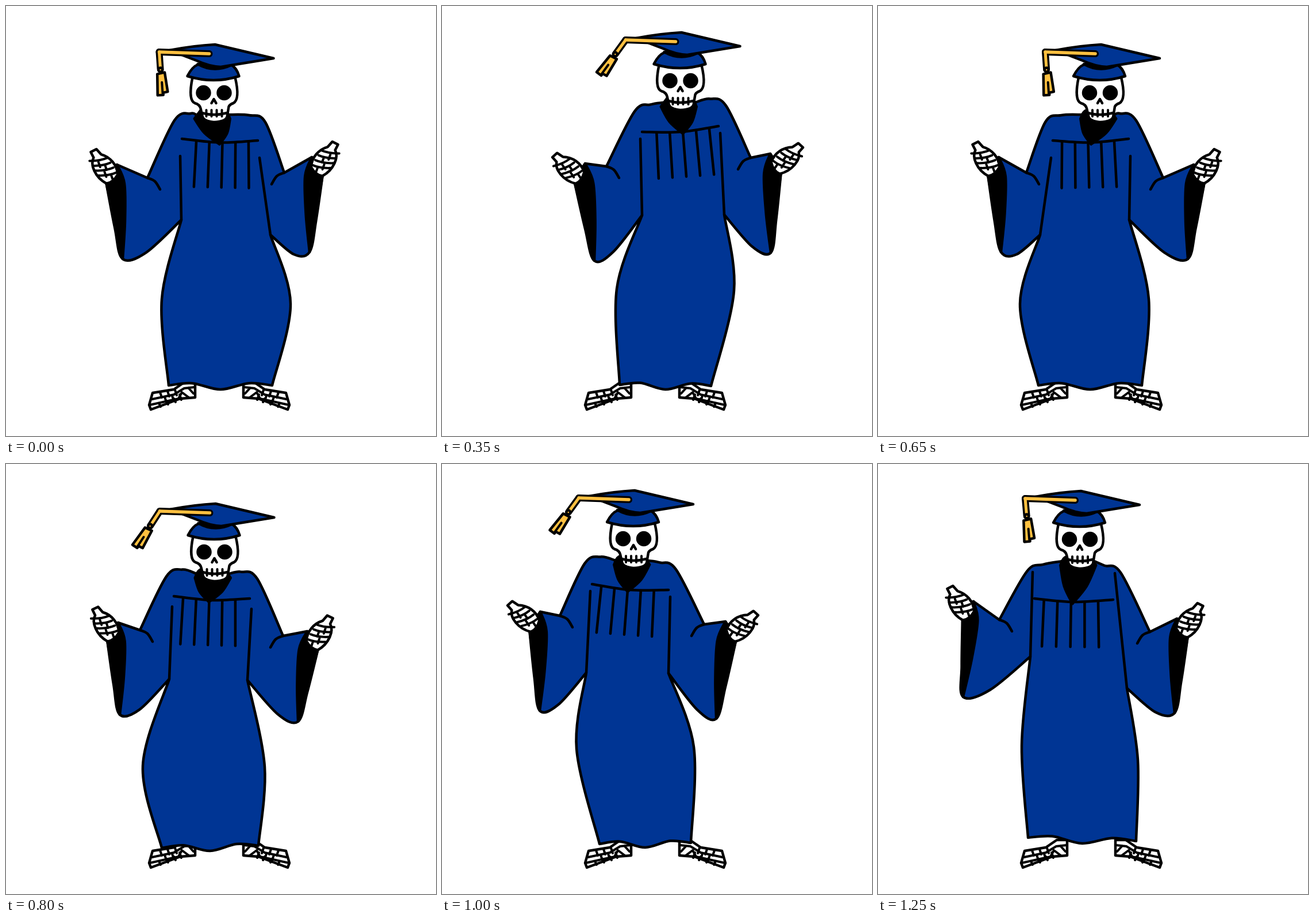
Animation, 748 px wide and 748 px high, one loop 1300 ms. Source, as an HTML page with a canvas:

```html
<!DOCTYPE html>
<html lang="en">
<head>
<meta charset="utf-8">
<title>Dancing graduate</title>
<style>
  html, body { margin: 0; width: 100%; height: 100%; overflow: hidden; background: #fff; }
  canvas { display: block; }
</style>
</head>
<body>
<canvas id="stage" width="748" height="748"></canvas>
<script>
const ctx = document.getElementById('stage').getContext('2d');
const BLUE = '#003594', GOLD = '#ffc040', INK = '#000', WHITE = '#fff';
const STEP = 50, HALF = 650, AXIS = 742;

// Joints of half a dance cycle; the other half is its mirror image.
// Each side: elbow, wrist, cuff, armpit, hip, hem, yoke end.
// drop: start of the torso line below the yoke; hand, swing: angles in degrees.
const POSES = [
  { at: 0, head: [358.75, 151], drop: 30, hand: 32, swing: -4,
    left: [246, 299, 184, 303, 203, 440, 305, 372, 271, 510, 283, 660, 306, 231],
    right: [484, 290, 541, 290, 528, 428, 460, 398, 495, 518, 463, 660, 438, 234] },
  { at: 150, head: [382.25, 153], drop: 18, hand: 31, swing: 33,
    left: [260, 299, 209, 318, 234, 448, 322, 376, 292, 527, 303, 664, 318, 234],
    right: [509, 289, 556, 303, 544, 436, 458, 374, 504, 525, 471, 668, 450, 230] },
  { at: 350, head: [411.75, 130], drop: 12, hand: 47, swing: 36,
    left: [286, 279, 240, 301, 265, 443, 348, 364, 304, 492, 309, 659, 348, 219],
    right: [537, 264, 580, 284, 572, 429, 491, 363, 508, 495, 468, 661, 481, 209] },
  { at: 550, head: [425.25, 116], drop: 4, hand: 50, swing: -4,
    left: [298, 259, 248, 288, 257, 403, 337, 357, 303, 530, 291, 656, 368, 207],
    right: [553, 244, 604, 263, 617, 380, 496, 314, 497, 408, 479, 661, 500, 213] },
  { at: 600, head: [393.75, 131], drop: -46, hand: 32, swing: -5,
    left: [269, 292, 213, 296, 226, 433, 309, 390, 290, 515, 293, 656, 333, 236],
    right: [531, 271, 585, 266, 594, 405, 477, 335, 492, 490, 481, 650, 470, 234] }
];

const mod = (n, m) => (n % m + m) % m;
const mix = (a, b, u) => [a[0] + (b[0] - a[0]) * u, a[1] + (b[1] - a[1]) * u];
const mirror = list => list.map((v, i) => i % 2 ? v : AXIS - v);
const vector = p => [...p.left, ...p.right, ...p.head, p.drop, p.hand, p.swing];
const flipped = p => ({ ...p, left: mirror(p.right), right: mirror(p.left), head: mirror(p.head) });
const KEYS = [...POSES.map(vector), ...POSES.map(p => vector(flipped(p)))];

const keyTime = n => POSES[mod(n, POSES.length)].at + HALF * Math.floor(n / POSES.length);

// Hermite spline through the poses; even entries (x, angle) never overshoot.
function poseAt(t) {
  let i = 0;
  while (keyTime(i + 1) <= t) i++;
  const span = n => keyTime(n + 1) - keyTime(n);
  const h = span(i), u = (t - keyTime(i)) / h, w = 1 - u;
  return KEYS[0].map((_, j) => {
    const value = n => KEYS[mod(n, KEYS.length)][j];
    const rate = n => (value(n + 1) - value(n)) / span(n);
    const slope = n => {
      const a = rate(n - 1), b = rate(n);
      if (j % 2 === 0 && a * b <= 0) return 0;
      return (a * span(n) + b * span(n - 1)) / (span(n) + span(n - 1));
    };
    return w * w * (1 + 2 * u) * value(i) + u * u * (3 - 2 * u) * value(i + 1)
      + h * u * w * (w * slope(i) - u * slope(i + 1));
  });
}

// Smooth path through points; a doubled point makes a corner.
function curve(pts, closed) {
  const path = new Path2D();
  path.moveTo(...pts[0]);
  for (let i = 0; i < pts.length - 1; i++) {
    const b = pts[i], c = pts[i + 1], a = pts[i - 1] || b, d = pts[i + 2] || c;
    if (b === c) continue;
    path.bezierCurveTo(
      b[0] + (c[0] - a[0]) / 6, b[1] + (c[1] - a[1]) / 6,
      c[0] - (d[0] - b[0]) / 6, c[1] - (d[1] - b[1]) / 6, ...c);
  }
  if (closed) path.closePath();
  return path;
}

function paint(shape, fill, width = 4.5, color = INK) {
  const path = typeof shape === 'string' ? new Path2D(shape) : shape;
  if (fill) {
    ctx.fillStyle = fill;
    ctx.fill(path);
  }
  ctx.lineWidth = width;
  ctx.strokeStyle = color;
  ctx.stroke(path);
}

function dot(x, y, r, fill, width) {
  const path = new Path2D();
  path.arc(x, y, r, 0, 7);
  paint(path, fill, width);
}

function placed([x, y], degrees, flip, draw) {
  ctx.save();
  ctx.translate(x, y);
  ctx.rotate(degrees * Math.PI / 180);
  ctx.scale(flip, 1);
  draw();
  ctx.restore();
}

function foot() {
  paint('M329 654V681L303 683L252 702L249 694L255 673L292 667L311 654Z', WHITE, 4.5);
  paint('M254 684L292 676L310 665L328 663M250 694L300 683L306 672L318 681M317 664L326 674', null, 4);
  for (let i = 0; i < 3; i++) {
    const x = 268 + 13 * i, y = 672 - 2 * i;
    paint(`M${x} ${y}l3 9M${x + 8} ${y + 8}l3 9M${x - 2} ${y + 19 - 2 * i}l3 6`, null, 4);
  }
}

function hand() {
  paint('M-14 -3C-22 -18 -19 -36 -8 -48L-6 -60L5 -61L6 -50C18 -43 22 -20 11 0Q0 5 -14 -3Z', WHITE);
  for (let i = 0; i < 4; i++) {
    const y = -42 + 10 * i, x = i % 2 ? -4 : 3;
    paint(`M-14 ${y + 5}Q0 ${y + 3} 15 ${y - 7}M${x} ${y + 3}l2 9`, null, 4);
  }
}

function tassel() {
  paint('M0 0V30', null, 12);
  paint('M0 0V30', null, 5, GOLD);
  paint('M-6 38L7 36L10 70L2 71V75L-8 75Z', GOLD);
  paint('M1 53V72', null, 4);
  dot(0, 31, 3.5, GOLD, 4.5);
}

function head(swing) {
  paint('M-37 -27C-41 -8 -43 14 -33 18Q-25 20 -23 27L-20 40Q-19 49 0 51Q20 50 23 42L26 24' +
    'Q28 20 34 18C43 13 42 -6 37 -27Z', WHITE);
  dot(-18, 0, 11, INK);
  dot(18, 0, 11, INK);
  paint('M-4 18L0 11L4 18M-21 35Q0 41 23 35', null, 4.5);
  for (const x of [-13, -4, 5, 14]) paint(`M${x} 30v11`, null, 4);
  paint('M-46 -29Q-38 -45 -28 -49H30Q40 -43 44 -29Q0 -15 -46 -29Z', BLUE);
  paint('M-28 -50Q0 -34 30 -48Z', INK);
  paint('M-77 -74Q-35 -82 2 -84L104 -60L12 -45Q-8 -46 -30 -56Z', BLUE);
  paint('M-8 -68L-95 -71', null, 12);
  placed([-95, -71], swing, 1, tassel);
  paint('M-8 -68L-95 -71', null, 5.5, GOLD);
}

// Builds one half of the robe; inward is 1 on the left side, -1 on the right.
function robeSide([elbow, wrist, cuff, armpit, hip, hem, yoke], inward, headAt, hemMid, drop) {
  const near = (p, dx, dy) => [p[0] + dx * inward, p[1] + dy];
  const shoulder = near(yoke, -13, drop * 0.2 - 38);
  const sleeve = near(wrist, 9, -27), rim = near(wrist, -10, 3);
  return {
    outline: [near(headAt, -28, 38), near(shoulder, 28, -12), shoulder, elbow, elbow,
      sleeve, sleeve, rim, rim, near(mix(rim, cuff, 0.6), -2, 0), cuff,
      near(mix(cuff, armpit, 0.4), 0, 16), armpit, armpit, hip, hem, hem,
      near(mix(hem, hemMid, 0.45), 0, -7)],
    lining: [sleeve, near(mix(sleeve, cuff, 0.2), 11, 0), near(mix(sleeve, cuff, 0.6), 8, 0), cuff, cuff, rim],
    lines: [
      [near(yoke, -3, drop), armpit],
      [elbow, near(elbow, 13, 6), near(elbow, 22, 20)]
    ],
    collar: near(headAt, -31, 45)
  };
}

function body(left, right, headAt, drop, handAngle) {
  const [hemL, yokeL] = left.slice(5), [hemR, yokeR] = right.slice(5);
  const hemMid = mix(hemL, hemR, 0.5), yokeMid = mix(yokeL, yokeR, 0.5);
  hemMid[1] += 7;
  const sides = [robeSide(left, 1, headAt, hemMid, drop), robeSide(right, -1, headAt, hemMid, drop)];
  const [a, b] = sides;

  paint(curve([...a.outline, hemMid, ...b.outline.reverse()], true), BLUE);
  for (const side of sides) {
    paint(curve(side.lining, true), INK);
    side.lines.forEach(line => paint(curve(line)));
  }

  // Five pleats hang at a right angle to the sagging yoke.
  paint(curve([yokeL, [yokeMid[0], yokeMid[1] + 5], yokeR]));
  const lean = (yokeL[1] - yokeR[1]) * 0.6;
  for (let i = 0; i < 5; i++) {
    const u = 0.19 + 0.172 * i, [x, y] = mix(yokeL, yokeR, u);
    paint(curve([[x, y + 20 * u * (1 - u)], [x + lean + (i - 2) * 1.2, y + 83]]));
  }

  placed(left[1], -handAngle, -1, hand);
  placed(right[1], handAngle, 1, hand);

  const tip = [(yokeMid[0] + headAt[0]) / 2 + 6, yokeMid[1] + 8];
  const bulge = (p, dx) => [(p[0] + tip[0]) / 2 + dx, (p[1] + tip[1]) / 2 + 3];
  paint(curve([a.collar, bulge(a.collar, -4), tip, tip, bulge(b.collar, 4), b.collar, b.collar,
    [headAt[0] + 20, headAt[1] + 30], [headAt[0] - 20, headAt[1] + 30]], true), INK);
}

function render(t) {
  const pose = poseAt(t % HALF), joints = [];
  const [drop, handAngle, swing] = pose.splice(-3);
  for (let i = 0; i < pose.length; i += 2) joints.push([pose[i], pose[i + 1]]);
  const headAt = joints.pop(), mirrored = t >= HALF;

  ctx.fillStyle = WHITE;
  ctx.fillRect(0, 0, 748, 748);
  placed([0, 0], 0, 1, foot);
  placed([AXIS, 0], 0, -1, foot);
  placed([mirrored ? AXIS : 0, 0], 0, mirrored ? -1 : 1,
    () => body(joints.slice(0, 7), joints.slice(7), headAt, drop, handAngle));
  const headX = mirrored ? AXIS - headAt[0] : headAt[0];
  placed([headX + 2.75, headAt[1]], 0, 1, () => head(swing));
}

ctx.lineCap = ctx.lineJoin = 'round';
function loop() {
  render(Math.floor(performance.now() / STEP) * STEP % (2 * HALF));
  requestAnimationFrame(loop);
}
loop();
</script>
</body>
</html>
```
